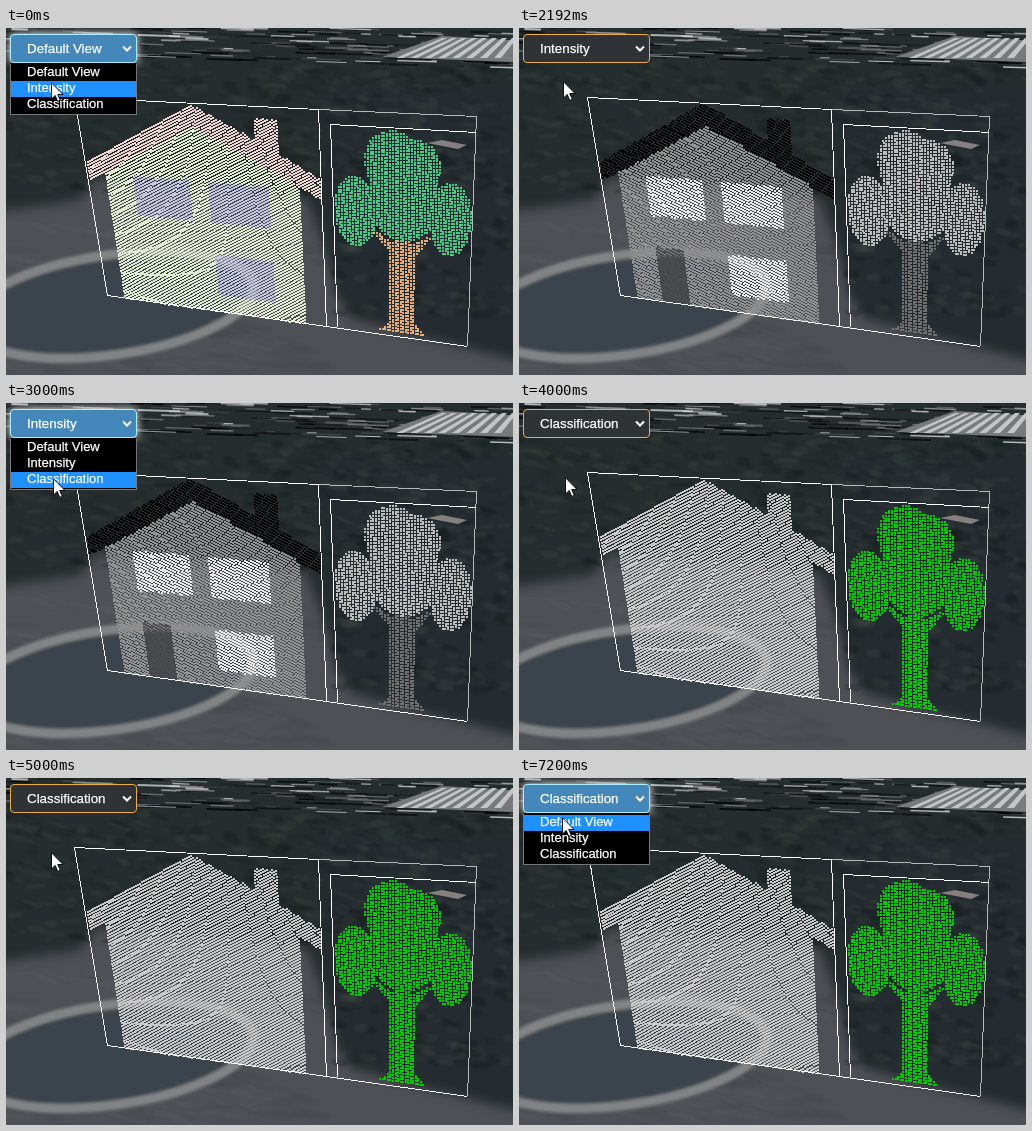
An HTML page with a canvas that plays this animation: 507x347 px, repeating every 8 s.

```html
<!DOCTYPE html>
<html lang="en">
<head>
<meta charset="utf-8">
<title>Point cloud styles</title>
<style>
  html, body { margin: 0; width: 100%; height: 100%; overflow: hidden; background: #282d30; }
  #stage { position: relative; width: 507px; height: 347px; overflow: hidden;
    font: 13px/13px "Liberation Sans", Arial, sans-serif; color: #fff; -webkit-text-stroke: .25px #fff; }
  canvas, svg { position: absolute; left: 0; top: 0; }
  #button { position: absolute; left: 4px; top: 6px; width: 127px; height: 29px; box-sizing: border-box;
    border: 1px solid #ea4; border-radius: 4px; background: #303336;
    padding-left: 16px; font-size: 13.33px; line-height: 27px; }
  #button svg { left: 111px; top: 9px; }
  .open #button { background: #48b; border-color: #aef; box-shadow: 0 0 8px #fff; }
  #list { position: absolute; left: 4px; top: 35px; width: 127px; height: 52px; box-sizing: border-box;
    border: 1px solid #777; border-top-color: #000; padding-top: 1px; background: #000; display: none; }
  .open #list { display: block; }
  #list div { height: 16px; padding-left: 16px; }
  #list .hot { background: #1e90ff; }
</style>
</head>
<body>
<div id="stage">
  <canvas id="ground" width="507" height="347"></canvas>
  <canvas class="view" width="507" height="347"></canvas>
  <canvas class="view" width="507" height="347"></canvas>
  <canvas class="view" width="507" height="347"></canvas>
  <svg width="507" height="347" fill="none" stroke="#fff" shape-rendering="crispEdges">
    <g transform="translate(.5 .5)">
      <path stroke="#b4b8b8" d="M312 81 470 88 461 318"/>
      <path d="M312 81 68 69 101 267 461 318M312 81 320 298M470 104 324 96 331 299"/>
    </g>
  </svg>
  <div id="button"><span id="label"></span>
    <svg width="12" height="10" fill="none" stroke="#fff" stroke-width="2"><path d="M1 2.500 5 6.500 9 2.500"/></svg>
  </div>
  <div id="list"><div>Default View</div><div>Intensity</div><div>Classification</div></div>
  <svg id="cursor" width="14" height="21">
    <path d="M.5 .8V17L4.200 13.400 6.800 19.400 9.300 18.300 6.700 12.500H12Z" fill="#fff" stroke="#000" stroke-width=".9"/>
  </svg>
</div>
<script>
const $ = id => document.getElementById(id);
const views = [...document.querySelectorAll('.view')];
const items = [...$('list').children];

let seed = 11;
const rnd = () => (seed = seed * 16807 % 2147483647) / 2147483647;
const between = (a, b) => a + (b - a) * rnd();
const mix = (a, b, t) => a + (b - a) * t;

// Aerial backdrop in soft tones
function drawGround() {
  const g = $('ground').getContext('2d');
  const fill = (color, pts) => { g.fillStyle = color; g.fill(new Path2D(`M${pts}Z`)); };
  const scatter = (n, [x0, y0, x1, y1], colors, w, h) => {
    for (let i = 0; i < n; i++) {
      g.fillStyle = colors[i % colors.length];
      g.beginPath();
      g.ellipse(between(x0, x1), between(y0, y1), between(w / 3, w), between(h / 3, h), between(-.1, .4), 0, 7);
      g.fill();
    }
  };

  g.fillStyle = '#262d2e';
  g.fillRect(0, 0, 507, 347);
  g.filter = 'blur(6px)';
  fill('#4f5056', '-20 186 75 172 90 150 300 170 345 290 520 335 520 360 -20 360');
  fill('#252c31', '318 60 520 60 520 322 400 300 330 270');

  g.filter = 'blur(1px)';
  const leaves = ['#161d1e77', '#3a444044', '#1b232455', '#424a3f44'];
  scatter(460, [0, 36, 507, 165], leaves, 13, 4);
  scatter(180, [330, 130, 507, 290], leaves, 12, 5);
  scatter(140, [0, 195, 320, 347], ['#6a6b7022', '#3c3e4322'], 30, 4);

  g.save();
  g.translate(105, 277);
  g.rotate(-.14);
  g.beginPath();
  g.ellipse(0, 0, 144, 50, 0, 0, 7);
  g.fillStyle = '#3b444c';
  g.fill();
  for (const [width, color] of [[12, '#606266'], [8, '#818384']]) {
    g.lineWidth = width;
    g.strokeStyle = color;
    g.stroke();
  }
  g.restore();

  // Rooftops along the horizon
  g.filter = 'blur(.4px)';
  g.save();
  g.rotate(.03);
  for (let i = 0; i < 230; i++) {
    const v = Math.floor(240 * rnd() ** 2);
    g.fillStyle = `rgba(${v},${v},${v + 4},.75)`;
    g.fillRect(between(-30, 500), between(-16, 24), between(6, 45), between(.8, 2.2));
  }
  g.restore();
  fill('#77797b', '376 29 436 8 507 12 507 34');
  for (let i = 0; i < 8; i++) {
    fill('#c4c5c6', `${390 + i * 14} 30 ${436 + i * 10} 10 ${441 + i * 10} 10 ${397 + i * 14} 30`);
  }
  fill('#85807d', '421 115 436 112 461 117 452 121');
}

// A plane spanned by four corners; (u, v) run from 0 to 1
const plane = (tl, tr, br, bl) => (u, v) =>
  [0, 1].map(k => mix(mix(tl[k], tr[k], u), mix(bl[k], br[k], u), v));
const houseAt = plane([68, 69], [312, 81], [320, 298], [101, 267]);
const treeAt = plane([324, 96], [470, 104], [461, 318], [331, 299]);

// Colours of each part in the three views
const pale = '#c9c9c9', lime = '#00cc00';
const paint = {
  wall: ['#e2ead2', '#929292', pale],
  door: ['#e2ead2', '#4c4c4c', pale],
  glass: ['#c6c8e2', '#e6e6e6', pale],
  roof: ['#edd6d4', '#030303', pale],
  bark: ['#e2ad7c', '#707070', lime],
  leaf: ['#4cc887', '#bdbdbd', lime]
};

function housePart(u, v) {
  const inside = (x, y, w, h) => u > x && u < x + w && v > y && v < y + h;
  const slope = Math.abs(u - .47) / (u < .47 ? .47 : .53);
  const top = .325 * slope;
  const eave = .11 + .31 * slope;
  if (inside(0, 0, 1, .5) && v > top && v < eave) return 'roof';
  if (inside(.727, .055, .095, .2) && v < eave) return 'roof';
  if (!inside(.075, 0, .832, 1) || v < eave) return;
  if (inside(.196, .727, .12, .273)) return 'door';
  const row = v < .65 ? .375 : .725;
  if (inside(.514, row, .26, .195) || (v < .65 && inside(.196, row, .236, .195))) return 'glass';
  return 'wall';
}

function treePart(u, v) {
  const side = Math.abs(u - .495);
  const lobe = (d, y, rx, ry) => Math.hypot(d / rx, (v - y) / ry);
  const crown = lobe(side, .345, .26, .195);
  if (crown < 1 || lobe(side - .34, .415, .155, .172) < 1
    || lobe(u - .42, .142, .19, .13) < 1 || lobe(side - .09, .18, .175, .13) < 1) return 'leaf';
  if (crown < 1.07 && side > .06) return;
  const branch = 1.4 * Math.max(0, .6 - v);
  const root = 15 * Math.max(0, v - .9) ** 2;
  if (v > .5 && v < .985 && side < .092 + branch + root) return 'bark';
}

// Square points on a grid; lean slants its rows
function drawPoints(g, view, at, partOf, cols, rows, lean) {
  for (let i = 0; i <= cols; i++) {
    const shift = lean * i % 1;
    for (let j = -1; j <= rows + 1; j++) {
      const u = i / cols, v = (j + shift) / rows;
      const part = partOf(u, v);
      if (!part) continue;
      const [x, y] = at(u, v).map(Math.round);
      g.fillStyle = paint[part][view];
      g.fillRect(x, y, 2, 2);
    }
  }
}

function drawView(canvas, view) {
  const g = canvas.getContext('2d');
  drawPoints(g, view, houseAt, housePart, 112, 70, view === 1 ? .3 : -.42);
  drawPoints(g, view, treeAt, treePart, 52, 76, 0);
}

// start ms, view, highlighted item (-1 = closed), cursor x, cursor y
const steps = [
  [0, 0, 1, 45, 54],
  [980, 1, -1, 44, 53],
  [3000, 1, 2, 47, 75],
  [4000, 2, -1, 46, 74],
  [5000, 2, -1, 45, 74],
  [6000, 2, 0, 43, 39]
];
let shown;

function show(step) {
  const [, view, hot, x, y] = shown = step;
  views.forEach((c, i) => c.style.visibility = i === view ? 'visible' : 'hidden');
  items.forEach((el, i) => el.classList.toggle('hot', i === hot));
  $('stage').classList.toggle('open', hot >= 0);
  $('label').textContent = items[view].textContent;
  $('cursor').style.transform = `translate(${x}px, ${y}px)`;
}

const start = performance.now();
function tick() {
  const t = (performance.now() - start) % 8000;
  const step = steps.findLast(s => s[0] <= t);
  if (step !== shown) show(step);
  requestAnimationFrame(tick);
}

drawGround();
views.forEach(drawView);
tick();
</script>
</body>
</html>
```
